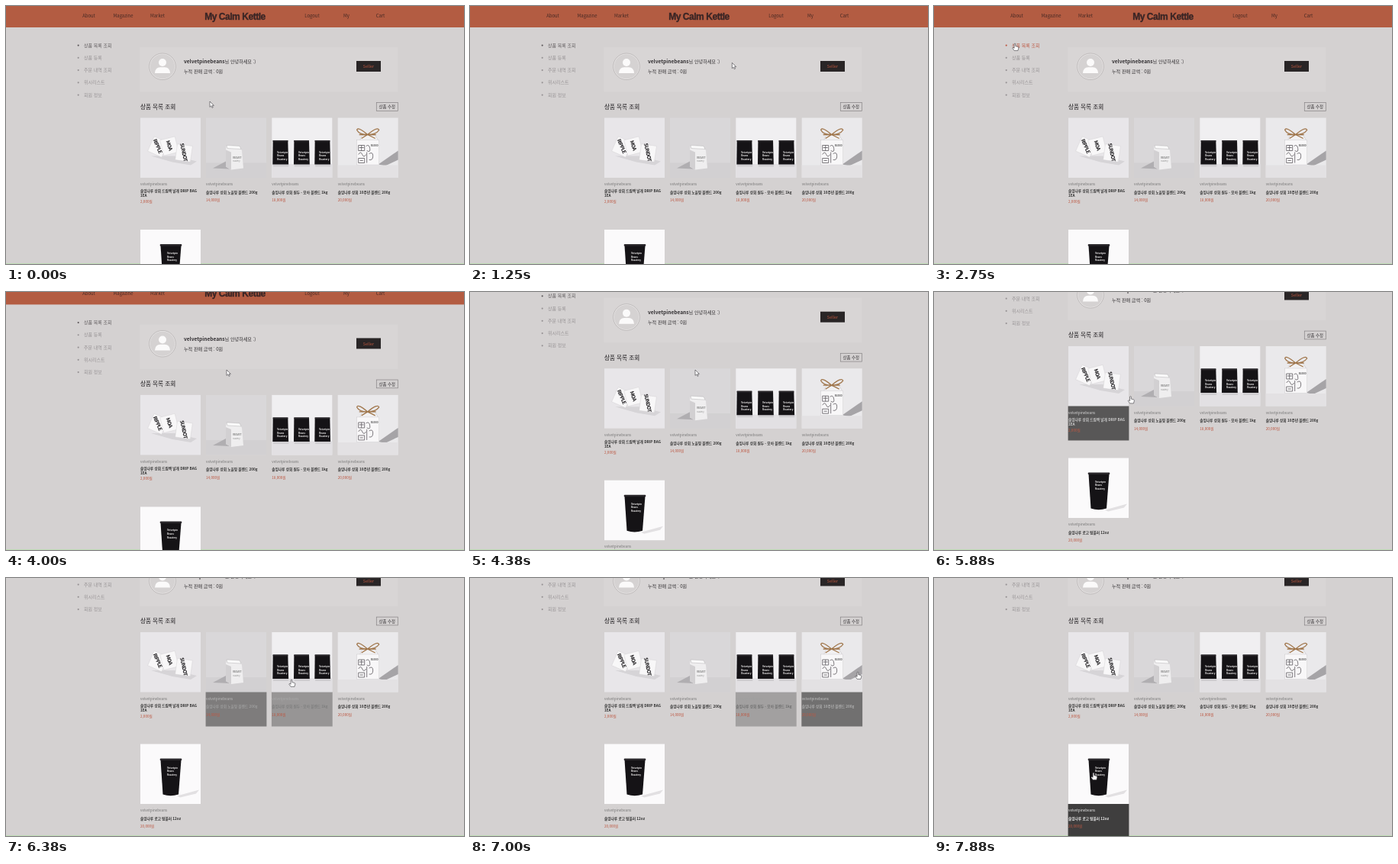
These frames come from a looping animation (600x338 px, 8000 ms). An HTML page:

```html
<!DOCTYPE html>
<html lang="ko">
<head>
<meta charset="utf-8">
<title>상품 목록 조회</title>
<style>
html, body { margin: 0; width: 100%; height: 100%; overflow: hidden; background: #d4d1d1; }
svg { display: block; width: 100%; height: 100%; }
text { font-family: "Noto Sans CJK KR", "Noto Sans CJK", "Noto Sans", sans-serif; white-space: pre; }
</style>
</head>
<body>
<svg id="stage" viewBox="0 0 600 338"></svg>
<script>
const LOOP = 8000, STEP = 125, FADE = 300;
const INK = '#333033', RED = '#bd5843', SHOP = 'velvetpinebeans', BRAND = '솔잎나루';
const stage = document.getElementById('stage');

function add(parent, tag, attrs, content) {
  const el = document.createElementNS('http://www.w3.org/2000/svg', tag);
  for (const key in attrs) el.setAttribute(key, attrs[key]);
  if (content !== undefined) el.textContent = content;
  return parent.appendChild(el);
}
const group = (parent, attrs = {}) => add(parent, 'g', attrs);
const rect = (parent, x, y, width, height, fill, more) =>
  add(parent, 'rect', { x, y, width, height, fill, ...more });
const path = (parent, d, fill, more) => add(parent, 'path', { d, fill, ...more });
// Text is placed by the middle of its line.
const label = (parent, x, midY, content, size, fill = INK, more = {}) =>
  add(parent, 'text', { x, y: midY + size * 0.35, 'font-size': size, fill, ...more }, content);
const middle = { 'text-anchor': 'middle' };

rect(stage, 0, 0, 600, 338, '#d4d1d1');
rect(stage, 0, 337, 600, 1, '#bfdbb6');
const page = group(stage);

// Header
rect(page, 0, 0, 600, 28, '#b35c42');
[['About', 108.5], ['Magazine', 153.5], ['Market', 198.5], ['Logout', 401], ['My', 446], ['Cart', 490.5]]
  .forEach(([name, x]) => label(page, x, 13.3, name, 5.9, '#472a25', { ...middle, 'font-weight': 500 }));
label(page, 300, 13.6, 'My Calm Kettle', 12, '#3a2525', {
  ...middle, 'font-weight': 700, 'letter-spacing': -0.45, stroke: '#3a2525', 'stroke-width': 0.35,
  style: 'font-family:"Liberation Sans",sans-serif'
});

// Side menu
const menu = ['상품 목록 조회', '상품 등록', '주문 내역 조회', '위시리스트', '회원 정보'].map((name, i) => {
  const y = 51.6 + i * 16.25, color = i ? '#979395' : '#5f5b5d';
  const el = group(page, { fill: color });
  add(el, 'circle', { cx: 94.7, cy: y, r: 1.1 });
  label(el, 102, y, name, 6, 'inherit').removeAttribute('fill');
  return { el, color, box: [100, y - 6, 40, 12] };
});

// Profile panel
rect(page, 175.5, 54, 338, 58.5, '#d8d5d5');
add(page, 'circle', { cx: 205, cy: 79.3, r: 16.6, fill: '#d5d2d2', stroke: '#efeded', 'stroke-width': 0.8 });
add(page, 'circle', { cx: 205, cy: 79.3, r: 17.3, fill: 'none', stroke: '#a19d9d', 'stroke-width': 0.5 });
add(page, 'circle', { cx: 205, cy: 74, r: 5, fill: '#fbfafa' });
path(page, 'M195 88 Q195.5 80.3 202 80.3 H208 Q214.5 80.3 215 88Z', '#fbfafa');
const greeting = label(page, 233, 73, '', 6.1);
add(greeting, 'tspan', { 'font-weight': 700, 'font-size': 6.6 }, SHOP);
add(greeting, 'tspan', {}, '님 안녕하세요 :)');
label(page, 233, 86, '누적 판매 금액 : 0원', 6.1);
rect(page, 459, 72, 32, 14, '#292526');
label(page, 475, 79.4, 'Seller', 5.4, '#b9563f', middle);

label(page, 176, 132.3, '상품 목록 조회', 7.6, INK, { 'font-weight': 500, stroke: INK, 'stroke-width': 0.15 });
rect(page, 485.3, 126.6, 28, 10.8, 'none', { stroke: '#858183', 'stroke-width': 0.7 });
label(page, 499.3, 132.2, '상품 수정', 5.4, INK, middle);

// Product pictures, drawn in a 79 x 78.5 box
function packText(g, x, y) {
  ['Velvetpin', 'Beans', 'Roastery'].forEach((line, i) =>
    label(g, x, y + i * 4.6, line, 3, '#f0eeee', { 'font-weight': 700 }));
}
function dripBags(g) {
  rect(g, 0, 0, 79, 78.5, '#e8e6e9');
  path(g, 'M14 50 L45 50 L74 57 L66 62 L42 58Z', '#d6d4d7');
  [[23, 38, 24, 'RIPPLE', 66], [38, 37, -14, 'MOA', 72], [57, 46, 8, 'SUNDOT', 78]]
    .forEach(([x, y, tilt, word, wordTurn]) => {
      rect(g, x - 10, y - 10.5, 20, 21, '#f8f7f8', {
        stroke: '#d0ced0', 'stroke-width': 0.4, transform: `rotate(${tilt} ${x} ${y})`
      });
      label(g, x - 1, y, word, 6.6, '#1c1a1d', {
        ...middle, 'font-weight': 900, 'letter-spacing': -0.6, transform: `rotate(${wordTurn} ${x} ${y})`
      });
    });
}
function whiteBag(g) {
  rect(g, 0, 0, 79, 78.5, '#d9d7d9');
  rect(g, 0, 59, 79, 19.5, '#d2d0d2');
  path(g, 'M9 66 L26 57 L31 67Z', '#b0aeb1');
  path(g, 'M27 36 L44 37 L47 43 L49 66 L33 68 L26 64 L26 42Z', '#efeeef');
  path(g, 'M26 42 L33 45 L33 68 L26 64Z', '#d2d0d2');
  path(g, 'M27 36 L44 37 L46 41 L28 40Z', '#fafafa', { stroke: '#a5a3a5', 'stroke-width': 0.4 });
  label(g, 35, 52, 'VELVET', 3.2, '#777', { 'font-weight': 700 });
  label(g, 35, 57, 'roastery', 2.5, '#888');
}
function blackBags(g) {
  rect(g, 0, 0, 79, 78.5, '#f0eff1');
  rect(g, 0, 60.5, 79, 18, '#e2e0e3');
  [1, 28.7, 56].forEach(x => {
    path(g, `M${x} 60 L${x + 1} 64 H${x + 21} V60Z`, '#cfcdd0');
    path(g, `M${x + 0.4} 29.5 H${x + 20} L${x + 20.8} 61 H${x}Z`, '#151316');
    rect(g, x + 0.4, 29.5, 19.6, 1.8, '#2b282c');
    packText(g, x + 6, 45);
  });
}
function giftBox(g) {
  rect(g, 0, 0, 79, 78.5, '#eae9eb');
  path(g, 'M53 61 L79 43 V55 L62 63Z', '#a6a4a7');
  rect(g, 0, 62, 79, 16.5, '#e3e1e3');
  path(g, 'M28 31 L32 23 H49 L54 31Z', '#f2f1f2', { stroke: '#b5b3b5', 'stroke-width': 0.4 });
  rect(g, 25, 29, 29, 32.5, '#f8f7f8', { stroke: '#c5c3c5', 'stroke-width': 0.4 });
  path(g, 'M39 22 Q26 11 25 16 Q28 22 39 22 Q52 11 54 16 Q50 22 39 22 L31 27 M39 22 L49 27 M28 22 H50',
    'none', { stroke: '#a0764b', 'stroke-width': 1.3 });
  path(g, 'M27 36 H35 V43 H27Z M28 39 H34 M31 36 V43 M27 48 q3 -5 5 0 t5 0 M27 53 H35 V59 H27Z M29 56 H33 M38 45 v14 M41 47 q5 -3 5 3 t-5 5 M37 37 q4 -3 5 3 t-4 3',
    'none', { stroke: '#5c595d', 'stroke-width': 0.8 });
  label(g, 43, 36, 'BLEND', 3, '#555', { 'font-weight': 700 });
}
function tumbler(g) {
  rect(g, 0, 0, 79, 78.5, '#fbfafb');
  path(g, 'M48 68 L77 60 L73 65 L52 70Z', '#e2e0e2');
  path(g, 'M26.5 21 L53.5 21 L50 66 Q39.5 69.5 29.5 66Z', '#151316');
  rect(g, 25.7, 19, 28.6, 2.6, '#29262a', { rx: 1 });
  packText(g, 35, 31);
}

// Product cards
const cards = [
  [176, 146.5, dripBags, [`${BRAND} 상회 드립백 날개 DRIP BAG`, '1EA'], '2,000원'],
  [262, 146.5, whiteBag, [`${BRAND} 상회 노을빛 블렌드 200g`], '14,000원'],
  [348.3, 146.5, blackBags, [`${BRAND} 상회 원두 - 모아 블렌드 1kg`], '18,000원'],
  [434.7, 146.5, giftBox, [`${BRAND} 상회 10주년 블렌드 200g`], '20,000원'],
  [176, 293, tumbler, [`${BRAND} 로고 텀블러 12oz`], '20,000원']
].map(([x, y, draw, lines, price]) => {
  const g = group(page, { transform: `translate(${x} ${y})` });
  const extra = lines.length - 1;
  draw(g);
  const shade = rect(g, -0.4, 78.5, 79.8, 45, '#000', { opacity: 0 });
  const texts = [[label(g, 0, 87, SHOP, 4.6), 118]];
  lines.forEach((line, i) =>
    texts.push([label(g, 0, 97.7 - extra * 1.5 + i * 6, line, 4.65, INK, { 'font-weight': 700 }), 44]));
  label(g, 0, 108.2 + extra * 1.7, price, 4.6, RED);
  return { shade, texts, box: [x, y, 79, 123] };
});

// Pointers
const outline = { stroke: '#37343a', 'stroke-width': 0.6, 'stroke-linejoin': 'round' };
const arrow = path(stage, 'M0 0 V7.4 L1.8 5.8 L3 8.4 L4.2 7.8 L3.1 5.3 H5.4Z', '#fff', outline);
const hand = path(stage,
  'M-.9 .6 Q0 -.5 .8 .6 V3.6 L4.2 4.5 Q5 4.8 4.8 6 L4 9.4 H-.9 L-3.2 6.2 Q-3 5 -1.8 5.6 L-.9 6.3Z', '#fff', outline);

// [ms, x, y] of the pointer tip
const pointerKeys = [
  [0, 267, 125], [130, 267, 125], [880, 277, 72], [1000, 277, 72], [1750, 476, 79], [2000, 518, 88],
  [2500, 300, 66], [2625, 232, 58], [2750, 106, 49], [3250, 110, 113], [3500, 226, 112], [3750, 285, 102],
  [4375, 295, 102], [4625, 240, 222], [4875, 219, 240], [5500, 219, 240], [5750, 225, 137],
  [6000, 290, 136], [6250, 350, 134], [6375, 374, 133], [6625, 390, 130], [6800, 434.5, 127],
  [7000, 508, 123], [7200, 506, 126], [7450, 252, 222], [7625, 212, 252], [7875, 209, 255], [8000, 209, 255]
];
const scrollKeys = [[0, 0], [3875, 0], [4375, 46.3], [4625, 75.5], [8000, 75.5]];
// [card, enter, leave]
const hovers = [[4, 4625, 5560], [0, 5625, 5875], [1, 5875, 6250], [2, 6250, 6800], [3, 6800, 7200], [4, 7450, 9000]];
// The pointer only turns into a hand over cards once the page has settled.
const linkBoxes = [...menu.map(item => item.box), [459, 72, 32, 14], [485, 126, 29, 11]];

const clamp = v => Math.max(0, Math.min(1, v));
function at(keys, t) {
  const i = Math.max(1, keys.findIndex(key => key[0] >= t));
  const a = keys[i - 1], b = keys[i], k = (t - a[0]) / (b[0] - a[0]);
  return a.slice(1).map((v, n) => v + (b[n + 1] - v) * k);
}
const inside = ([x, y, w, h], px, py) => px >= x && px < x + w && py >= y && py < y + h;

function render(t) {
  const [x, y] = at(pointerKeys, t), [scroll] = at(scrollKeys, t);
  const pageY = y + scroll;
  page.setAttribute('transform', `translate(0 ${-scroll})`);

  menu.forEach(({ el, color, box }) => el.setAttribute('fill', inside(box, x, pageY) ? RED : color));

  cards.forEach(({ shade, texts }, i) => {
    const level = Math.max(...hovers.filter(h => h[0] === i)
      .map(([, enter, leave]) => clamp(Math.min((t - enter) / FADE, 1 - (t - leave) / FADE))));
    shade.setAttribute('opacity', 0.7 * level);
    texts.forEach(([el, dark]) => {
      const tone = Math.round(dark + (240 - dark) * level);
      el.setAttribute('fill', `rgb(${tone},${tone},${tone})`);
    });
  });

  const onCard = hovers.some(([, enter, leave]) => t >= enter && t < leave);
  const onLink = onCard || linkBoxes.some(box => inside(box, x, pageY));
  arrow.setAttribute('visibility', onLink ? 'hidden' : 'visible');
  hand.setAttribute('visibility', onLink ? 'visible' : 'hidden');
  [arrow, hand].forEach(el => el.setAttribute('transform', `translate(${x} ${y})`));
}

const start = performance.now();
function tick() {
  const t = (performance.now() - start) % LOOP;
  render(Math.floor(t / STEP) * STEP);
  requestAnimationFrame(tick);
}
tick();
</script>
</body>
</html>
```
